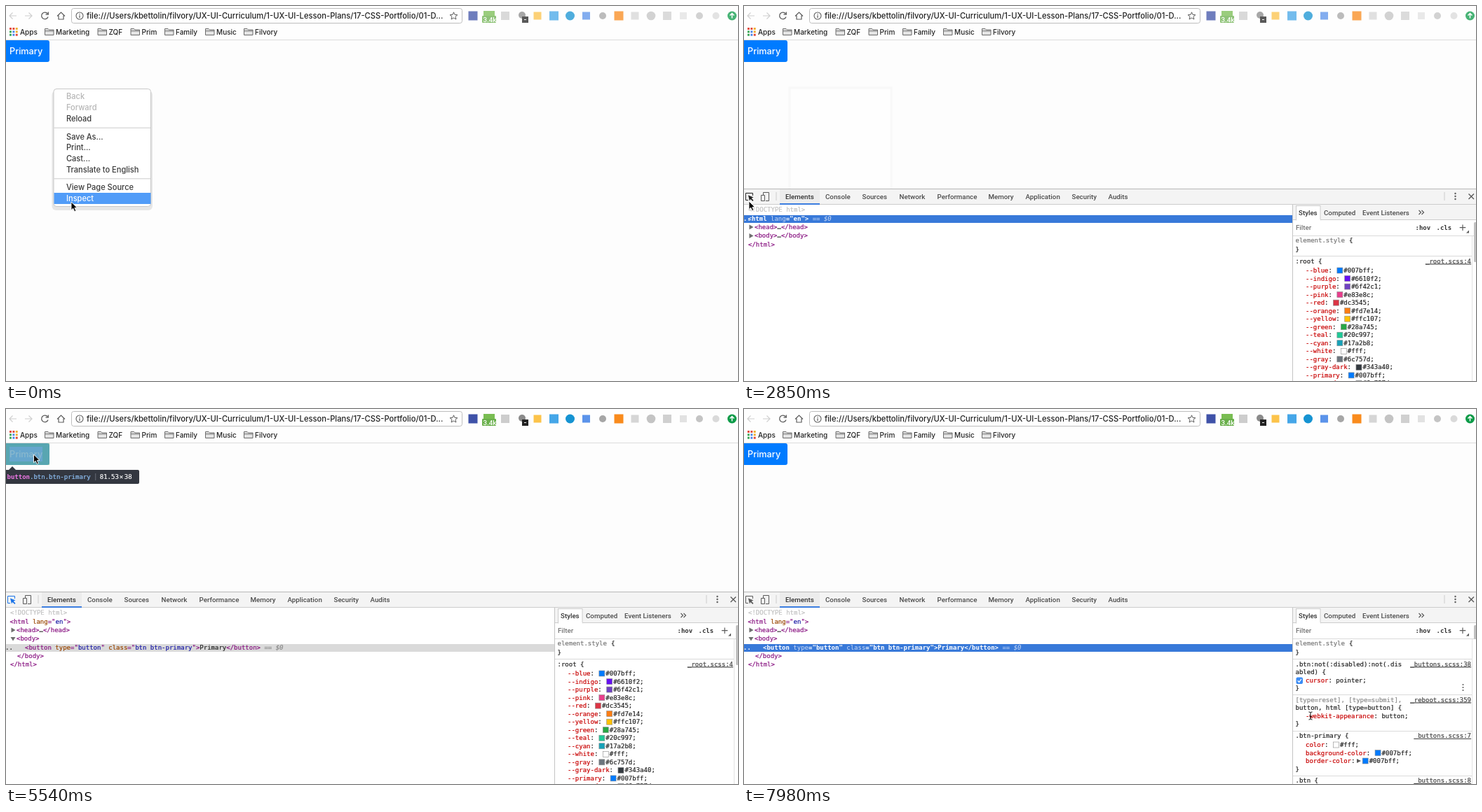
Animation, 1044 px wide and 536 px high, one loop 8000 ms. Source, as an HTML page:

```html
<!DOCTYPE html>
<html lang="en">
<head>
<meta charset="utf-8">
<title>Inspecting a button</title>
<style>
  html, body { margin: 0; width: 100%; height: 100%; overflow: hidden; background: #fdfdfd; }
  svg { display: block; width: 1044px; height: 536px; }
  text { white-space: pre; }
  text, tspan { fill: currentColor; }
  .ui { font: 500 10px Inter, sans-serif; }
  .ui.url { font-size: 11.2px; }
  .ui.item { font-size: 11.05px; }
  .ui.label { font-size: 12.7px; }
  .tab { font: 500 9.75px Roboto, sans-serif; }
  .code { font: 9px "DejaVu Sans Mono", monospace; stroke: currentColor; stroke-width: .2px; }
  .code.b { font-weight: bold; stroke: none; }
  .t { color: #881280; } .a { color: #994500; } .v { color: #1a1aa6; }
  .g { color: #888; font-style: italic; } .d { color: #c0c0c0; } .k { color: #222; }
  .p { color: #c80000; }
  .row { fill: #dadada; } .on .row { fill: #3879d9; }
  .on .pick tspan { color: #fff; font-weight: bold; stroke: none; }
  .on .pick .a, .on .pick .g { color: #cbdaf5; font-weight: normal; }
  .link { text-decoration: underline; }
</style>
</head>
<body>
<svg id="stage" viewBox="0 0 1044 536"></svg>
<script>
const CH = 5.42; // advance of the code font
const esc = s => s.replace(/&/g, '&amp;').replace(/</g, '&lt;');
const text = (x, y, s, cls, color = '#333', more = '') =>
  `<text x="${x}" y="${y}" class="${cls}" color="${color}" ${more}>${esc(s)}</text>`;
const rect = (x, y, w, h, fill, more = '') =>
  `<rect x="${x}" y="${y}" width="${w}" height="${h}" fill="${fill}" ${more}/>`;
const path = (d, stroke, fill = 'none', more = '') =>
  `<path d="${d}" stroke="${stroke}" fill="${fill}" ${more}/>`;
const circle = (x, y, r, fill, more = '') => `<circle cx="${x}" cy="${y}" r="${r}" fill="${fill}" ${more}/>`;
const group = (id, body) => `<g id="${id}">${body}</g>`;
// A code line from alternating class and string
const line = (x, y, parts, cls = '') => {
  let spans = '';
  for (let i = 0; i < parts.length; i += 2)
    spans += `<tspan class="${parts[i]}">${esc(parts[i + 1])}</tspan>`;
  return `<text x="${x}" y="${y}" class="code ${cls}">${spans}</text>`;
};

function browserBar() {
  const folder = x => path(`M${x} 41.5V32.5H${x + 4.5}L${x + 6} 34H${x + 12.5}V41.5ZM${x} 35.7H${x + 12.5}`, '#6b6b6b', '#e4e4e4');
  const marks = [['Marketing', 71], ['ZQF', 146.5], ['Prim', 193.5], ['Family', 242], ['Music', 300], ['Filvory', 355]];
  const dots = ['#e2483a', '#e2483a', '#f0ae2b', '#3ba757', '#4a86e8', '#f0ae2b', '#3ba757', '#4a86e8', '#e2483a'];
  const square = (x, c, r = 6) => rect(x - r, 14 - r, 2 * r, 2 * r, c);
  const icons =
    square(666, '#3f52a8', 6.5) +
    rect(681, 7, 16, 9, '#79bd52') + rect(679, 14, 20, 10, '#6ab04c', 'rx="1"') +
    text(680.5, 22.5, '3.4k', 'tab', '#fff') +
    square(712, '#cdcdcd') + circle(736, 13, 5, '#8a8a8a') +
    rect(736, 15, 9, 9, '#222') + rect(739, 19, 3, 1, '#fff') +
    square(758, '#fcc34a', 5.5) + square(781.5, '#45a6e8', 6.5) + circle(804.5, 14, 6.5, '#1593d2') +
    square(827.5, '#5b93ea', 5.5) + circle(851, 14, 5, '#a6a6a6') + square(874, '#f98b1d', 6.5) +
    square(897, '#d6d6d6', 5.5) + circle(920, 14, 6.3, '#c4c4c4') + square(943, '#d0d0d0', 6) +
    square(966, '#e2e2e2', 5) + circle(989, 14, 5, '#c4c4c4') + circle(1012.5, 14, 5, '#dadada') +
    circle(1035.5, 14, 6.5, '#0b9b48') + path('M1035.5 17.5V11M1032.5 13.5L1035.5 10.5 1038.5 13.5', '#fff', 'none', 'stroke-width="1.5"');
  return rect(0, 0, 1044, 48, '#fefefe') + rect(0, 48, 1044, 1, '#dcdcdc') +
    path('M15 14H5M9.5 9.5L5 14 9.5 18.5M27 14H37M32.5 9.5L37 14 32.5 18.5', '#d0d0d0', 'none', 'stroke-width="1.2"') +
    path('M59.3 11A4.8 4.8 0 1 0 60 15.5M60.3 8.5V12.2H56.5', '#5c5c5c', 'none', 'stroke-width="1.3"') +
    path('M73 14.5L78.5 9 84 14.5M75 13.5V19H82V13.5', '#5c5c5c', 'none', 'stroke-width="1.2"') +
    rect(93.5, 3.5, 557, 21, '#fff', 'rx="3" stroke="#bdbdbd"') +
    circle(105, 14, 5, 'none', 'stroke="#5c5c5c" stroke-width="1.1"') + path('M105 13.3V17M105 11V12.2', '#5c5c5c', 'none', 'stroke-width="1.2"') +
    text(115, 18.2, 'file:///Users/kbettolin/filvory/UX-UI-Curriculum/1-UX-UI-Lesson-Plans/17-CSS-Portfolio/01-D...', 'ui url', '#222') +
    path('M638.5 8.8L640 12.4 643.9 12.7 641 15.2 641.9 19 638.5 17 635.1 19 636 15.2 633.1 12.7 637 12.4Z', '#5c5c5c') +
    group('icons', icons) +
    dots.map((c, i) => rect(5 + i % 3 * 4.4, 31 + Math.floor(i / 3) * 4.4, 2.9, 2.9, c)).join('') +
    text(20, 40.6, 'Apps', 'ui', '#222') +
    marks.map(([s, x]) => folder(x - 15.5) + text(x, 40.6, s, 'ui', '#222')).join('');
}

function contextMenu() {
  const items = [['Back', 129], ['Forward', 145], ['Reload', 161], ['Save As...', 186.5], ['Print...', 202],
    ['Cast...', 217.7], ['Translate to English', 233.5], ['View Page Source', 259], ['Inspect', 274.7]];
  return rect(65.5, 121, 143.5, 171, '#e6e6e6', 'rx="6"') +
    rect(68, 118.5, 138.5, 168, '#fff', 'rx="4" stroke="#c8c8c8"') +
    rect(68, 173.5, 138, 1.5, '#dcdcdc') + rect(68, 246, 138, 1.5, '#dcdcdc') +
    rect(68.5, 267, 138, 16, '#519cf8') +
    items.map(([s, y], i) => text(86, y + 4, s, 'ui item', i < 2 ? '#b6b6b6' : i == 8 ? '#fff' : '#3a3a3a')).join('');
}

function tooltip(width, tag, rest, size) {
  const x = 1.5 + (tag + rest).length * CH, [w, h] = size.split('×');
  const sizeX = x + 13, crossX = sizeX + w.length * CH + 1;
  return path('M3 88L9 82 15 88Z', 'none', '#333740') + rect(-5, 87, width + 5, 20, '#333740', 'rx="2"') +
    text(1.5, 100, tag, 'code b', '#ee78e6') + text(1.5 + tag.length * CH, 100, rest, 'code', '#8fc1f5') +
    rect(x + 6.5, 92, 1, 10, '#666b75') +
    text(sizeX, 100, w, 'code', '#fff') + text(crossX, 100, '×', 'code', '#fff') + text(crossX + 7, 100, h, 'code', '#fff');
}
const pageTint = tag => rect(0, 49, 1044, 31, 'rgba(111,168,220,.66)') + tooltip(84, tag, '', '1280×38');
const buttonTint = () => rect(-5, 49, 67, 31, 'rgba(147,196,125,.6)') +
  rect(5, 54, 47, 21, 'rgba(111,168,220,.66)') + tooltip(190, 'button', '.btn.btn-primary', '81.53×38');

function toolbar() {
  return rect(0, 261, 1044, 275, '#fff') + rect(0, 262, 1044, 22, '#f4f4f4') +
    rect(0, 261, 1044, 1, '#b8b8b8') + rect(0, 283, 1044, 1, '#ccc');
}
function tabs() {
  const names = [['Elements', 59], ['Console', 116], ['Sources', 168.5], ['Network', 221.5], ['Performance', 275.5],
    ['Memory', 348.5], ['Application', 401.5], ['Security', 467.5], ['Audits', 519.5]];
  return rect(51, 262, 57, 21, '#ececec') + rect(51, 282, 57, 2, '#3b7de0') +
    names.map(([s, x], i) => text(x, 275.6, s, 'tab', i ? '#4c4c4c' : '#333')).join('') +
    group('picker', path('M12.5 271V267.5H2.5V277.5H6', 'currentColor') +
      path('M6 270.5L13.5 273.5 10.7 274.8 13.5 277.8 12.3 279 9.3 276 8 278.5Z', 'none', 'currentColor')) +
    path('M27.5 270V266.5H35.5V278.5H31M24.5 270.5H29.5V278.5H24.5Z', '#5a5a5a') +
    rect(45.5, 266, 1, 12, '#ccc') + rect(998.5, 266, 1, 12, '#ccc') +
    [268, 272, 276].map(y => circle(1014.5, y, 1.2, '#5a5a5a')).join('') +
    path('M1033.5 268.5L1041 276M1041 268.5L1033.5 276', '#5a5a5a', 'none', 'stroke-width="1.4"');
}

const rowY = i => 294.4 + i * 12.33;
const arrow = (i, open) => path(open ? `M6.5 ${rowY(i) - 5.5}h7l-3.5 5.5z` : `M7.5 ${rowY(i) - 6.5}v7l6-3.5z`, 'none', '#6e6e6e');
const htmlTag = ['t', '<html ', 'a', 'lang', 't', '="', 'v', 'en', 't', '">'];
const pickRow = i => `<rect y="${Math.round(rowY(i) - 8)}" width="782" height="11" class="row"/>` +
  line(-1, rowY(i), ['k', '..'], 'pick');
const head = arrow(2) + line(15, rowY(2), ['t', '<head>', 'k', '…', 't', '</head>']);
const doctype = line(6, rowY(0), ['d', '<!DOCTYPE html>']);
const closedTree = () => doctype + pickRow(1) + line(5.5, rowY(1), [...htmlTag, 'g', ' == $0'], 'pick') + head +
  arrow(3) + line(15, rowY(3), ['t', '<body>', 'k', '…', 't', '</body>']) + line(6, rowY(4), ['t', '</html>']);
const openTree = () => doctype + line(5.5, rowY(1), htmlTag) + head +
  arrow(3, true) + line(15, rowY(3), ['t', '<body>']) + pickRow(4) +
  line(27, rowY(4), ['t', '<button ', 'a', 'type', 't', '="', 'v', 'button', 't', '" ', 'a', 'class', 't', '="',
    'v', 'btn btn-primary', 't', '">', 'k', 'Primary', 't', '</button>', 'g', ' == $0'], 'pick') +
  line(16, rowY(5), ['t', '</body>']) + line(6, rowY(6), ['t', '</html>']);

function stylesFrame() {
  return rect(782, 284, 1, 252, '#c4c4c4') + rect(783, 284, 261, 21, '#f4f4f4') + rect(783, 305, 261, 1, '#ccc') +
    rect(787.5, 285.5, 34.5, 20.5, '#fff', 'stroke="#ccc"') + rect(788, 305, 34, 2, '#fff') +
    text(791, 298.6, 'Styles', 'tab') + text(827, 298.6, 'Computed', 'tab', '#4c4c4c') +
    text(882, 298.6, 'Event Listeners', 'tab', '#4c4c4c') +
    path('M962.5 292l3 3-3 3M966.5 292l3 3-3 3', '#5a5a5a', 'none', 'stroke-width="1.2"') +
    text(787, 320, 'Filter', 'tab', '#757575') + rect(783, 328, 261, 1, '#dadada') +
    group('filters', text(957.5, 320, ':hov', 'code b') + text(987.5, 320, '.cls', 'code b') +
      path('M1025 312.5V321M1020.7 316.7H1029.3', '#5a5a5a', 'none', 'stroke-width="1.2"') + path('M1030 324.5h4v-4z', 'none', '#5a5a5a'));
}
const divider = y => rect(783, y, 255, 1, '#dadada');
const plain = (y, s, color = '#222') => text(786.5, y + 3, s, 'code', color);
const link = (y, s) => text(1037, y + 3, s, 'code link', '#444', 'text-anchor="end"');
const prop = (y, name, value, colour, gap = 2) => {
  const x = 801 + (name.length + gap) * CH;
  return line(801, y + 3, ['p', name, 'k', ': ']) +
    (colour ? rect(x + 1.5, y - 4, 8, 8, colour, 'stroke="#8a8a8a" stroke-width=".6"') : '') +
    text(colour ? x + 11 : x, y + 3, value + ';', 'code', '#222');
};
const paneTop = thumb => rect(1038, 329, 1, 207, '#e2e2e2') + rect(1041, 309, 4, thumb, '#c1c1c1', 'rx="1.5"') +
  plain(335, 'element.style', '#777') + text(863, 338, '{', 'code', '#222') + plain(348, '}') + divider(357);

function rootStyles() {
  const vars = { blue: '#007bff', indigo: '#6610f2', purple: '#6f42c1', pink: '#e83e8c', red: '#dc3545',
    orange: '#fd7e14', yellow: '#ffc107', green: '#28a745', teal: '#20c997', cyan: '#17a2b8', white: '#fff',
    gray: '#6c757d', 'gray-dark': '#343a40', primary: '#007bff', secondary: '#6c757d' };
  return paneTop(57) + plain(364.5, ':root {') + link(364.5, '_root.scss:4') +
    Object.entries(vars).map(([n, c], i) => prop(378 + i * 11.53, '--' + n, c, c)).join('');
}
function buttonStyles() {
  return paneTop(20) + plain(364.5, '.btn:not(:disabled):not(.dis') + link(364.5, '_buttons.scss:38') + plain(376, 'abled) {') +
    prop(388, 'cursor', 'pointer') + plain(399, '}') +
    group('ruleHover', rect(787.5, 383.5, 9.5, 9.5, '#3b8cf5', 'rx="2"') + path('M789.7 388.3l2 2.2 3.2-4.6', '#fff', 'none', 'stroke-width="1.3"') +
      [394, 398, 402].map(y => circle(1025.5, y, 1, '#5a5a5a')).join('')) +
    divider(408) + plain(415.5, '[type=reset], [type=submit],', '#888') + link(415.5, '_reboot.scss:359') +
    plain(427, 'button, html [type=button] {') + prop(439, '-webkit-appearance', 'button') + plain(450, '}') +
    divider(460) + plain(467, '.btn-primary {') + link(467, '_buttons.scss:7') +
    prop(480, 'color', '#fff', '#fff') + prop(491.5, 'background-color', '#007bff', '#007bff') +
    prop(503, 'border-color', '#007bff', '#007bff', 2.7) + path('M874 500v6l6-3z', 'none', '#5a5a5a') + plain(514.5, '}') +
    divider(524) + plain(531, '.btn {') + link(531, '_buttons.scss:8');
}

const cursors = {
  arrow: path('M0 0V11.7L2.7 9.2 4.7 13.7 6.8 12.8 4.9 8.4H8.5Z', '#fff', '#000', 'stroke-width=".9"'),
  hand: path('M-1.2 7.5V.8Q0-1 1.2.8V5Q2.3 3.8 3.4 5.2 4.5 4.4 5.4 5.8 7 5.2 7.2 7V9.5Q7 11 6 13H-.5Q-1.2 11-3.8 8.2-4.2 6.2-2.3 6.9Z', '#111', '#fff', 'stroke-width="1.1"') +
    path('M1.2 8.5V11M3 8.5V11M4.8 8.5V11', '#111', 'none', 'stroke-width=".7"'),
  beam: path('M-2.5-5.5Q0-5.5 0-4V4Q0 5.5-2.5 5.5M2.5-5.5Q0-5.5 0-4M0 4Q0 5.5 2.5 5.5M-1.5 1H1.5', '#111')
};

const stage = document.getElementById('stage');
stage.innerHTML = browserBar() +
  rect(-5, 49, 67, 31, '#007bff', 'rx="3"') + text(5, 69.4, 'Primary', 'ui label', '#fff') +
  group('ghost', rect(65, 117, 145, 174, '#fefefe', 'stroke="#f8f8f8" stroke-width="3"')) +
  group('menu', contextMenu()) +
  group('htmlTint', pageTint('html')) + group('bodyTint', pageTint('body')) + group('buttonTint', buttonTint()) +
  group('panel', toolbar()) + group('tabs', tabs()) +
  group('closed', closedTree()) + group('opened', openTree()) + group('styles', stylesFrame()) +
  group('rootRules', rootStyles()) + group('buttonRules', buttonStyles()) +
  Object.entries(cursors).map(([id, d]) => group(id, d)).join('');

const el = id => document.getElementById(id);
const track = [
  [0, 93, 280, 'arrow'], [920, 94, 282.5, 'hand'],
  [2110, 62.5, 273.5, 'hand'], [2260, 36, 271, 'hand'], [2400, 16, 274, 'arrow'], [2550, 7, 279, 'arrow'],
  [3590, 8, 278, 'arrow'], [3740, 7, 275, 'arrow'], [3880, 6, 273, 'arrow'], [4030, 6, 270.5, 'arrow'],
  [4770, 22, 205, 'arrow'], [4920, 36.5, 130.5, 'arrow'], [5060, 40, 104, 'arrow'], [5210, 41, 84, 'arrow'],
  [5360, 40, 72, 'arrow'], [5540, 39.5, 65, 'arrow'],
  [7330, 120, 112, 'arrow'], [7490, 350, 220, 'arrow'], [7650, 600, 326, 'arrow'], [7820, 800, 394, 'arrow'], [7980, 808, 438.5, 'beam']
];

function draw(t) {
  const within = (from, to = 8000) => t >= from && t < to;
  const show = (id, on) => { el(id).style.display = on ? '' : 'none'; };
  show('ghost', within(330, 4770));
  show('menu', within(0, 330));
  el('menu').style.opacity = t < 150 ? 1 : 0.5;
  el('icons').style.opacity = t < 2990 ? 0.75 : 1;
  show('htmlTint', within(1210, 2850) || within(4770, 5360));
  show('buttonTint', within(5360, 6740));
  show('bodyTint', within(7650, 7820));
  show('panel', within(630));
  show('tabs', within(780));
  show('closed', within(920, 5360));
  show('opened', within(5360));
  el('closed').setAttribute('class', t < 4330 ? 'on' : '');
  el('opened').setAttribute('class', t >= 6740 ? 'on' : '');
  el('picker').style.color = within(4330, 6740) ? '#1a73e8' : within(2550, 4330) ? '#222' : '#5a5a5a';
  show('styles', within(920));
  el('filters').setAttribute('transform', `translate(${t < 1060 ? 12 : 0})`);
  show('rootRules', within(1060, 6880));
  show('buttonRules', within(6880));
  show('ruleHover', within(7820));
  const [, x, y, kind] = track.findLast(key => key[0] <= t);
  for (const id in cursors) show(id, id == kind);
  el(kind).setAttribute('transform', `translate(${x} ${y})`);
}

function tick() {
  draw(performance.now() % 8000);
  requestAnimationFrame(tick);
}
tick();
</script>
</body>
</html>
```
